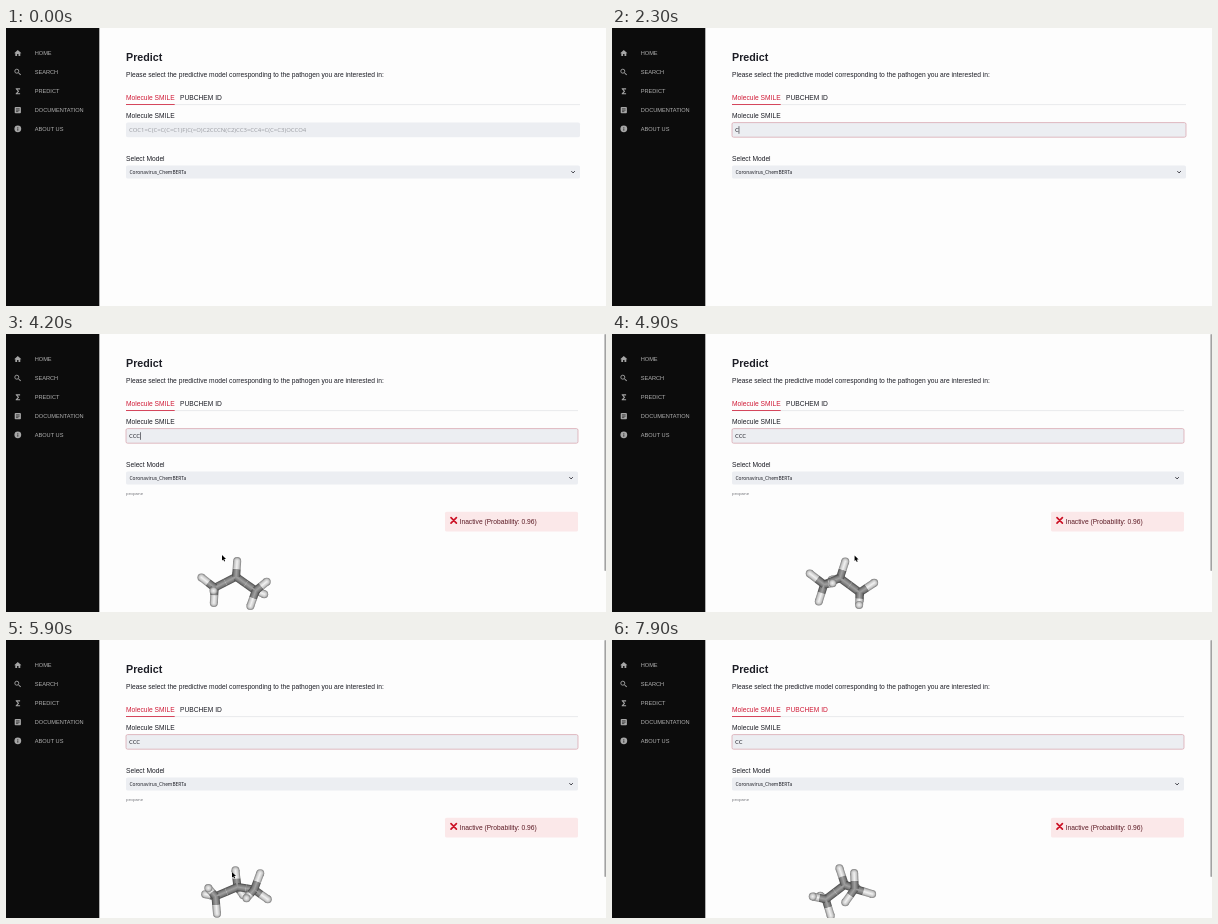
Animation, 600 px wide and 278 px high, one loop 8 s. Source, as an HTML page with a canvas:

```html
<!DOCTYPE html>
<html lang="en">
<head>
<meta charset="utf-8">
<title>Predict</title>
<style>
  html, body { margin: 0; width: 100%; height: 100%; overflow: hidden; background: #fdfdfd; }
  svg, canvas { position: absolute; left: 0; top: 0; width: 600px; height: 278px; }
  text { font: 6.68px "Liberation Sans", Arial, sans-serif; fill: #1d1e26; white-space: pre; }
  .title { font-size: 10.7px; font-weight: bold; }
  .menu text { font-size: 5.65px; fill: #b2b2b2; }
  .menu path { fill: #a6a6a6; }
  .field { font: 500 5.96px "Noto Sans", "Open Sans", sans-serif; }
  .choice { font: 4.83px "Noto Sans", "Open Sans", sans-serif; }
  .note { font: 4.3px "Noto Sans", "Open Sans", sans-serif; fill: #74757b; }
  .box { fill: #eceef2; }
  .active { fill: #d01c38; }
</style>
</head>
<body>
<svg viewBox="0 0 600 278">
  <rect width="93.3" height="278" fill="#0c0c0c"/>
  <g class="menu">
    <text x="28.7" y="27.4">HOME</text>
    <text x="28.7" y="46.4">SEARCH</text>
    <text x="28.7" y="65.4">PREDICT</text>
    <text x="28.7" y="84.4">DOCUMENTATION</text>
    <text x="28.7" y="103.4">ABOUT US</text>
    <path d="M11.8 22 8.2 25.2h1.1v2.9h1.8v-2h1.4v2h1.8v-2.9h1.1z"/>
    <circle cx="10.8" cy="43.2" r="2" fill="none" stroke="#a6a6a6" stroke-width=".9"/>
    <path d="m12.1 45 .6-.6 2.3 2.2-.7.7z"/>
    <path d="M9.7 60.3h4.4v1.1h-2.6l1.7 1.9-1.7 1.9h2.6v1.1H9.7v-.8l2.1-2.2-2.1-2.2z"/>
    <rect x="8.7" y="79.1" width="6.2" height="6.2" rx=".8" fill="#a6a6a6"/>
    <path d="M10 80.8h3.6M10 82.2h3.6M10 83.6h2.4" stroke="#0c0c0c" stroke-width=".6"/>
    <circle cx="11.8" cy="100.8" r="3.4" fill="#a6a6a6"/>
    <path d="M11.8 99v.8m0 .6v2.3" stroke="#0c0c0c" stroke-width=".7"/>
  </g>

  <text class="title" x="120" y="33.4">Predict</text>
  <text x="120" y="49.3">Please select the predictive model corresponding to the pathogen you are interested in:</text>
  <text class="active" x="120" y="72.2">Molecule SMILE</text>
  <text id="pubchem" x="174" y="72.2">PUBCHEM ID</text>
  <rect class="wide" x="120" y="76.3" height=".8" fill="#e4e5e9"/>
  <rect class="active" x="120" y="76.1" width="48.7" height=".8"/>

  <text x="120" y="90.2">Molecule SMILE</text>
  <rect id="input" class="box wide" x="120" y="94.6" height="14.6" rx="1.6" stroke-width=".7"/>
  <text id="value" class="field" x="123" y="104.1"></text>
  <rect id="caret" y="98.2" width=".6" height="7.6" fill="#1d1e26"/>

  <text x="120" y="133.2">Select Model</text>
  <rect class="box wide" x="120" y="137.5" height="13" rx="1.6"/>
  <text class="choice" x="123.5" y="145.8">Coronavirus_ChemBERTa</text>
  <path id="chevron" d="m565.4 143.2 1.7 1.7 1.7-1.7" fill="none" stroke="#1d1e26" stroke-width=".9"/>
  <text id="note" class="note" x="120" y="160.9">propane</text>

  <g id="result">
    <rect x="439" y="177.7" width="133" height="19.9" rx="1.6" fill="#fbe8e9"/>
    <path d="m445 183.7 5.4 5.4m0-5.4-5.4 5.4" stroke="#cc1226" stroke-width="1.7" stroke-linecap="round"/>
    <text x="453.6" y="190" style="fill:#5c1b25">Inactive (Probability: 0.96)</text>
    <rect x="598.4" width="1.6" height="237" rx=".8" fill="#a2a2a2"/>
  </g>
</svg>
<canvas></canvas>
<script>
const LOOP = 8000, ENTER = 350, FOCUS = 900, TYPE = 2150, KEY_GAP = 200;
const NOTE = 3100, RESULT = 3700, RETURN = 3800, HOVER = 6950, ERASE = 7500;
const PLACEHOLDER = 'COC1=C(C=C(C=C1)F)C(=O)C2CCCN(C2)CC3=CC4=C(C=C3)OCCO4';
const INK = '#1d1e26', RED = '#d01c38';

// Pointer waypoints: time, x, y
const POINTER = [[ENTER, 250, 116], [700, 208, 102], [RETURN, 208, 108], [4150, 216, 221],
  [4400, 216, 221], [5400, 269, 222], [5900, 226, 232], [6400, 238, 240], [7050, 195, 70]];
// Dragged view: time, yaw, pitch in degrees
const DRAG = [[4400, 0, 0], [5400, 60, 30], [5900, -20, 40], [6400, -45, 27]];

const PIVOT_X = 229.5, PIVOT_Y = 251, SCALE = 16.2, RADIUS = 4;
const CARBON = ['#474747', '#7a7a7a', '#a0a0a0'];
const HYDROGEN = ['#7c7c7c', '#c8c8c8', '#f1f1f1'];

const $ = id => document.getElementById(id);
const wide = document.querySelectorAll('.wide');
const canvas = document.querySelector('canvas');
const ctx = canvas.getContext('2d');
const ratio = window.devicePixelRatio || 1;
canvas.width = 600 * ratio;
canvas.height = 278 * ratio;

const rad = deg => deg * Math.PI / 180;
const mix = (a, b, k) => a.map((c, i) => c + (b[i] - c) * k);
const show = (el, on) => el.setAttribute('visibility', on ? 'visible' : 'hidden');

function sample(keys, t) {
  const i = keys.findIndex(k => k[0] > t);
  if (i < 0) return keys[keys.length - 1].slice(1);
  if (i === 0) return keys[0].slice(1);
  const a = keys[i - 1], b = keys[i], k = (t - a[0]) / (b[0] - a[0]);
  return mix(a, b, k * k * (3 - 2 * k)).slice(1);
}

// Propane from bond lengths and angles, centred on its carbons
function buildPropane() {
  const CC = 1.53, CH = 1.09, half = rad(55.7);
  const sin = Math.sin(half), cos = Math.cos(half);
  const middle = [0, CC * cos * 2 / 3, 0];
  const atoms = [{ at: middle, colors: CARBON }], bonds = [];
  function attach(from, direction, length, colors) {
    const at = atoms[from].at.map((c, i) => c + direction[i] * length);
    bonds.push([from, atoms.push({ at, colors }) - 1]);
    return atoms.length - 1;
  }
  for (const side of [-1, 1]) {
    attach(0, [0, cos, side * sin], CH, HYDROGEN);
    const axis = [side * sin, -cos, 0], across = [side * cos, sin, 0];
    const carbon = attach(0, axis, CC, CARBON);
    const twist = side > 0 ? 60 : 0;
    for (let k = 0; k < 3; k++) {
      const a = rad(twist + k * 120);
      const direction = axis.map((c, i) => c / 3 + .943 * (across[i] * Math.cos(a) + (i === 2) * Math.sin(a)));
      attach(carbon, direction, CH, HYDROGEN);
    }
  }
  return { atoms, bonds };
}
const propane = buildPropane();

function turn(p, i, j, deg) {
  const c = Math.cos(rad(deg)), s = Math.sin(rad(deg)), q = [...p];
  q[i] = p[i] * c + p[j] * s;
  q[j] = p[j] * c - p[i] * s;
  return q;
}

function project(p, yaw, pitch) {
  const resting = turn(turn(p, 1, 2, 26), 0, 1, 4);
  const [x, y, z] = turn(turn(resting, 0, 2, yaw), 1, 2, pitch).map(c => c * SCALE);
  const k = 470 / (470 - z);
  return [PIVOT_X + x * k, PIVOT_Y - y * k, z];
}

function ball([x, y], [edge, mid, core]) {
  const g = ctx.createRadialGradient(x, y, 0, x, y, RADIUS);
  g.addColorStop(0, core);
  g.addColorStop(.6, mid);
  g.addColorStop(1, edge);
  ctx.fillStyle = g;
  ctx.beginPath();
  ctx.arc(x, y, RADIUS, 0, 7);
  ctx.fill();
}

function stick(a, b, [edge, mid, core]) {
  const dx = b[0] - a[0], dy = b[1] - a[1], l = Math.hypot(dx, dy);
  if (l < .1) return;
  const nx = -dy / l * RADIUS, ny = dx / l * RADIUS;
  const g = ctx.createLinearGradient(a[0] - nx, a[1] - ny, a[0] + nx, a[1] + ny);
  [edge, mid, core, mid, edge].forEach((color, i) => g.addColorStop([0, .2, .5, .8, 1][i], color));
  ctx.strokeStyle = g;
  ctx.lineWidth = RADIUS * 2;
  ctx.beginPath();
  ctx.moveTo(a[0], a[1]);
  ctx.lineTo(b[0], b[1]);
  ctx.stroke();
}

function drawMolecule(t) {
  const [yaw, pitch] = sample(DRAG, t);
  const { atoms, bonds } = propane;
  const points = atoms.map(atom => project(atom.at, yaw, pitch));
  const parts = points.map((p, i) => [p[2], () => ball(p, atoms[i].colors)]);
  for (const [i, j] of bonds) {
    const m = mix(points[i], points[j], .5);
    // The small bias lets a stick run smoothly into its round end
    for (const n of [i, j]) {
      const p = points[n];
      parts.push([(p[2] + m[2]) / 2 + 3, () => stick(p, m, atoms[n].colors)]);
    }
  }
  parts.sort((a, b) => a[0] - b[0]).forEach(part => part[1]());
}

function drawPointer(t) {
  if (t < ENTER || (t > TYPE && t < RETURN) || t > ERASE) return;
  const [x, y] = sample(POINTER, t);
  ctx.save();
  ctx.translate(x, y);
  ctx.lineJoin = 'round';
  if (y > 94.5 && y < 109.5) {
    ctx.lineWidth = .8;
    ctx.strokeStyle = '#222';
    ctx.stroke(new Path2D('M-1.5-3.5Q0-3.5 0-2.6Q0-3.5 1.5-3.5M0-2.6V2.6M-1.5 3.5Q0 3.5 0 2.6Q0 3.5 1.5 3.5M-.8.8H.8'));
  } else {
    const arrow = new Path2D('M0 0V5.6L1.3 4.4 2.2 6.5 3.1 6.1 2.2 4.1H4Z');
    ctx.lineWidth = .9;
    ctx.strokeStyle = '#fff';
    ctx.stroke(arrow);
    ctx.fillStyle = '#000';
    ctx.fill(arrow);
  }
  ctx.restore();
}

function typedCount(t) {
  if (t < TYPE) return 0;
  return t < ERASE ? Math.min(3, 1 + Math.floor((t - TYPE) / KEY_GAP)) : 2;
}

function render(t) {
  const done = t >= RESULT, focused = t >= FOCUS, count = typedCount(t);
  wide.forEach(el => el.setAttribute('width', done ? 452 : 454));
  $('chevron').setAttribute('transform', `translate(${done ? -2 : 0} 0)`);
  $('input').setAttribute('stroke', focused ? '#d79fa9' : 'none');
  $('value').textContent = count ? 'C'.repeat(count) : PLACEHOLDER;
  $('value').style.fill = count ? INK : '#9c9ea4';
  $('caret').setAttribute('x', 122.9 + count * 3.77);
  $('pubchem').style.fill = t >= HOVER ? RED : INK;
  show($('caret'), focused && t % 1000 < 500);
  show($('note'), t >= NOTE);
  show($('result'), done);

  ctx.setTransform(ratio, 0, 0, ratio, 0, 0);
  ctx.clearRect(0, 0, 600, 278);
  if (done) drawMolecule(t);
  drawPointer(t);
}

const start = performance.now();
function tick() {
  render((performance.now() - start) % LOOP);
  requestAnimationFrame(tick);
}
tick();
</script>
</body>
</html>
```
